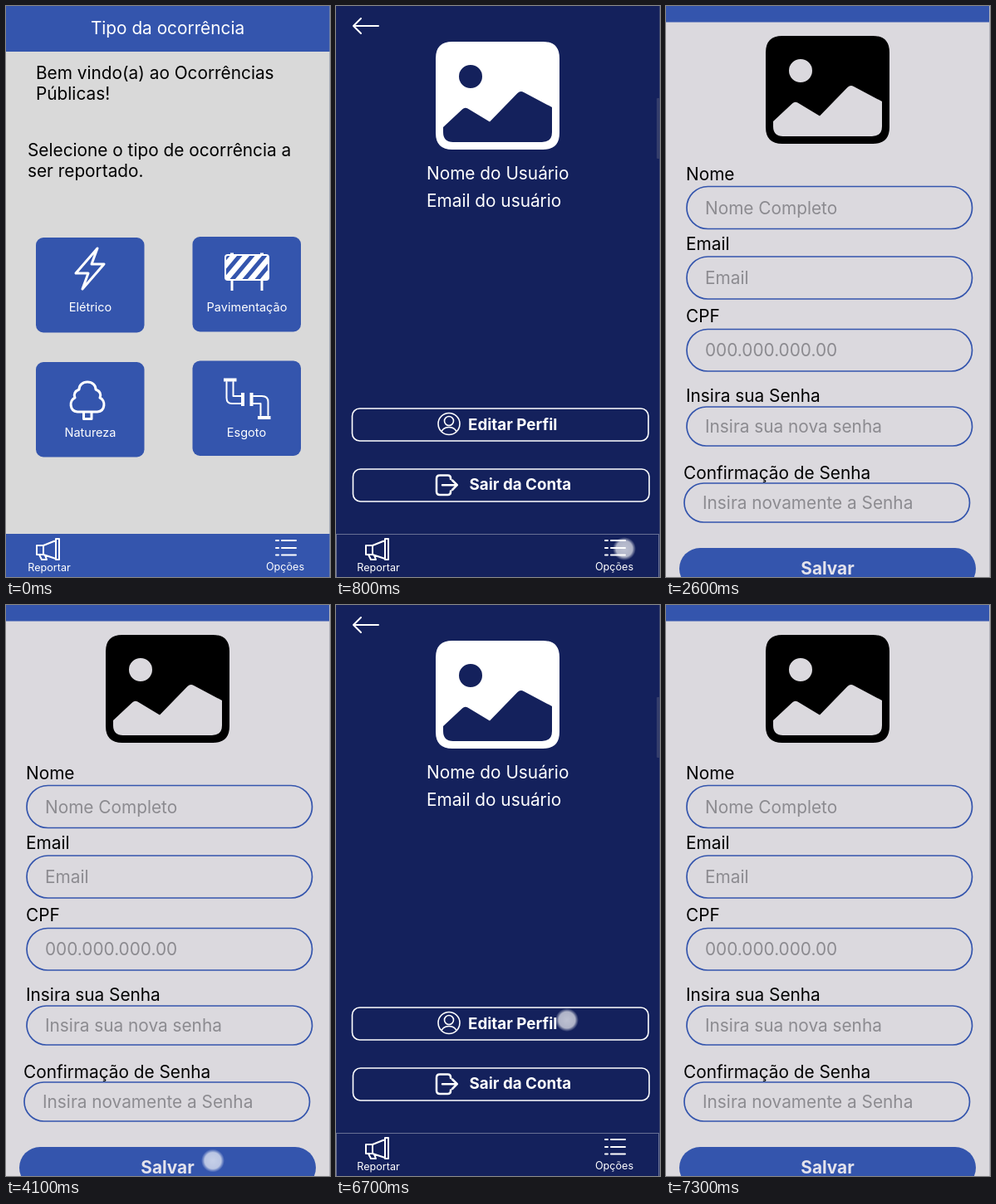
Animation, 390 px wide and 688 px high, one loop 8 s. Source, as an HTML page:

```html
<!DOCTYPE html>
<html lang="pt-BR">
<head>
<meta charset="utf-8">
<title>Ocorrências Públicas</title>
<style>
html, body { margin: 0; width: 100%; height: 100%; overflow: hidden; background: #d9d9d9; }
svg { display: block; width: 390px; height: 688px; }
text { font: 20.8px Inter, sans-serif; font-optical-sizing: none; }
.label { font-size: 14.5px; fill: #fff; text-anchor: middle; }
.tab { font-size: 12.6px; fill: #fff; text-anchor: middle; }
.bold { font-weight: 700; font-size: 18.8px; fill: #fff; }
.hint { fill: #8c8b90; }
.line { fill: none; stroke: #fff; stroke-width: 2; stroke-linecap: round; stroke-linejoin: round; }
.field { fill: none; stroke: #3455ad; stroke-width: 1.7; }
.blue { fill: #3455ad; }
</style>
</head>
<body>
<svg viewBox="0 0 390 688">
  <defs>
    <radialGradient id="glow">
      <stop offset="0" stop-color="#fff" stop-opacity=".72"/>
      <stop offset=".7" stop-color="#fff" stop-opacity=".66"/>
      <stop offset=".85" stop-color="#fff" stop-opacity=".3"/>
      <stop offset="1" stop-color="#fff" stop-opacity="0"/>
    </radialGradient>
    <clipPath id="board"><rect x="264" y="300" width="52" height="30" rx="3"/></clipPath>
    <path id="picture" fill-rule="evenodd" d="M140 43H249Q269 43 269 63V153Q269 173 249 173H140Q120 173 120 153V63Q120 43 140 43Z
      M148 85a14 14 0 1 0 28 0a14 14 0 1 0 -28 0Z
      M129 146L152 124.500Q155 121.500 158.500 123.500L185 139.500L218.500 105Q222 101.500 226 104L260 122V152Q260 164 248 164H141Q129 164 129 152Z"/>
    <g id="tabs">
      <g class="line">
        <path d="M37 650H45V661H37ZM45 650L60 644V666L45 661M60 642H64V667H60ZM40 661L43 667H49L47 662"/>
        <path d="M325 644h3m4 0H349M325 653h3m4 0H349M325 661.500h3m4 0H349"/>
      </g>
      <text class="tab" x="52" y="681">Reportar</text>
      <text class="tab" x="336" y="680">Opções</text>
    </g>
  </defs>

  <g id="home">
    <rect width="390" height="688" fill="#d9d9d9"/>
    <rect class="blue" width="390" height="55"/>
    <rect class="blue" y="636" width="390" height="52"/>
    <text x="194.5" y="33.500" fill="#fff" text-anchor="middle">Tipo da ocorrência</text>
    <text x="36" y="88">Bem vindo(a) ao Ocorrências</text>
    <text x="36" y="113">Públicas!</text>
    <text x="26" y="181">Selecione o tipo de ocorrência a</text>
    <text x="26" y="206">ser reportado.</text>
    <g class="blue">
      <rect x="36" y="279" width="130.500" height="114.500" rx="9"/>
      <rect x="224.500" y="278" width="130.500" height="114.500" rx="9"/>
      <rect x="36" y="429" width="130.500" height="114.500" rx="9"/>
      <rect x="224.500" y="427.500" width="130.500" height="114.500" rx="9"/>
    </g>
    <g class="line" stroke-width="3">
      <path style="stroke-width:3" d="M110 292L84 322H99L92 341L118 311H103Z"/>
      <rect x="264" y="300" width="52" height="30" rx="3"/>
      <path style="stroke-width:3" stroke-linecap="butt" d="M272 331V343M308 331V343M270 299h4M306 299h4"/>
      <path clip-path="url(#board)" style="stroke-width:6.500" d="M246 334L278 296M261 334L293 296M276 334L308 296M291 334L323 296M306 334L338 296"/>
      <path style="stroke-width:3" d="M98 453C92 453 88 457 88 462C83 464 81 468 83 472C76 475 76 488 86 489H110C120 488 120 475 113 472C115 468 113 464 108 462C108 457 104 453 98 453ZM93.500 490V497.500H103V490"/>
      <path d="M265.500 453V472Q265.500 479 272 479H283M273.500 453V470H283M298 470H308Q315.500 470 315.500 477V493M298 479H306.500V493"/>
      <path style="stroke-width:4;stroke-linecap:butt" d="M262 450.500H277.500M285 466V482M295.500 466V482M303 496H318.500"/>
    </g>
    <text class="label" x="101.500" y="368">Elétrico</text>
    <text class="label" x="290" y="368">Pavimentação</text>
    <text class="label" x="101.500" y="518.500">Natureza</text>
    <text class="label" x="289.500" y="518.500">Esgoto</text>
    <use href="#tabs"/>
    <rect x="389" width="1" height="688" fill="#8d94a8" opacity=".6"/>
  </g>

  <g id="options">
    <rect width="390" height="688" fill="#14215c"/>
    <rect x=".5" y="636.500" width="388" height="54" fill="none" stroke="#687094"/>
    <rect x="386" y="111" width="4" height="73" rx="1" fill="#343d6b"/>
    <rect x="389" width="1" height="688" fill="#3d466f"/>
    <path class="line" d="M51 24H21M30 15L21 24L30 33"/>
    <use href="#picture" fill="#fff"/>
    <text x="109" y="209" fill="#fff">Nome do Usuário</text>
    <text x="109" y="242" fill="#fff">Email do usuário</text>
    <g class="line">
      <rect x="19.500" y="485" width="356.500" height="39" rx="9" style="stroke-width:1.600"/>
      <rect x="20.500" y="558" width="356.500" height="39" rx="9" style="stroke-width:1.600"/>
      <g style="stroke-width:1.600">
        <circle cx="136" cy="503.500" r="13"/>
        <circle cx="136" cy="500" r="5.500"/>
        <path d="M127 512.500Q130 507.500 136 507.500T145 512.500"/>
      </g>
      <path style="stroke-width:2.500" d="M138 570V569Q138 565.500 134.500 565.500H125Q121 565.500 121 569.500V585Q121 589 125 589H134.500Q138 589 138 585.500V584.500M128 577.200H145.500M140 571.500L145.800 577.200L140 583"/>
    </g>
    <text class="bold" x="159" y="510.500">Editar Perfil</text>
    <text class="bold" x="160.500" y="583">Sair da Conta</text>
    <use href="#tabs" x="-1"/>
  </g>

  <g id="edit">
    <rect width="390" height="688" fill="#dbd9de"/>
    <rect class="blue" width="390" height="19.500"/>
    <use href="#picture" y="-7"/>
    <g id="fields"></g>
    <rect class="blue" x="16" y="653" width="357" height="50" rx="25"/>
    <text class="bold" style="font-size:20.800px;fill:#e4e3ec" x="194.500" y="685" text-anchor="middle">Salvar</text>
    <rect x="389" width="1" height="688" fill="#b4b4bd"/>
  </g>

  <circle id="touch" r="14" fill="url(#glow)"/>
</svg>
<script>
const $ = id => document.getElementById(id);

// label, hint, left, label baseline, box top, box height
$('fields').innerHTML = [
  ['Nome', 'Nome Completo', 25, 209.5, 217.5, 51],
  ['Email', 'Email', 25, 294, 302, 51],
  ['CPF', '000.000.000.00', 25, 381, 389.5, 50.5],
  ['Insira sua Senha', 'Insira sua nova senha', 25, 477, 483, 47],
  ['Confirmação de Senha', 'Insira novamente a Senha', 22, 570, 575, 47]
].map(([label, hint, x, y, top, h]) => `
  <text x="${x - 1}" y="${y}">${label}</text>
  <rect class="field" x="${x}" y="${top}" width="343.5" height="${h}" rx="${h / 2}"/>
  <text class="hint" x="${x + 22}" y="${top + h / 2 + 7.5}">${hint}</text>`).join('');

const LOOP = 8000;
const screens = [[0, 'home'], [800, 'options'], [2600, 'edit'], [4300, 'options'], [7100, 'edit']];
// start, end, x, y
const taps = [[800, 1000, 347, 654], [2400, 2600, 219, 505], [4000, 4250, 249, 669.5], [6700, 6800, 278, 500]];

function draw(now) {
  const t = now % LOOP;
  const current = screens.filter(s => s[0] <= t).pop()[1];
  for (const id of ['home', 'options', 'edit']) $(id).style.display = id === current ? '' : 'none';
  const tap = taps.find(([start, end]) => t >= start && t < end);
  $('touch').style.display = tap ? '' : 'none';
  if (tap) $('touch').setAttribute('transform', `translate(${tap[2]} ${tap[3]})`);
}

const begin = performance.now();
function tick() {
  draw(performance.now() - begin);
  requestAnimationFrame(tick);
}
tick();
</script>
</body>
</html>
```
